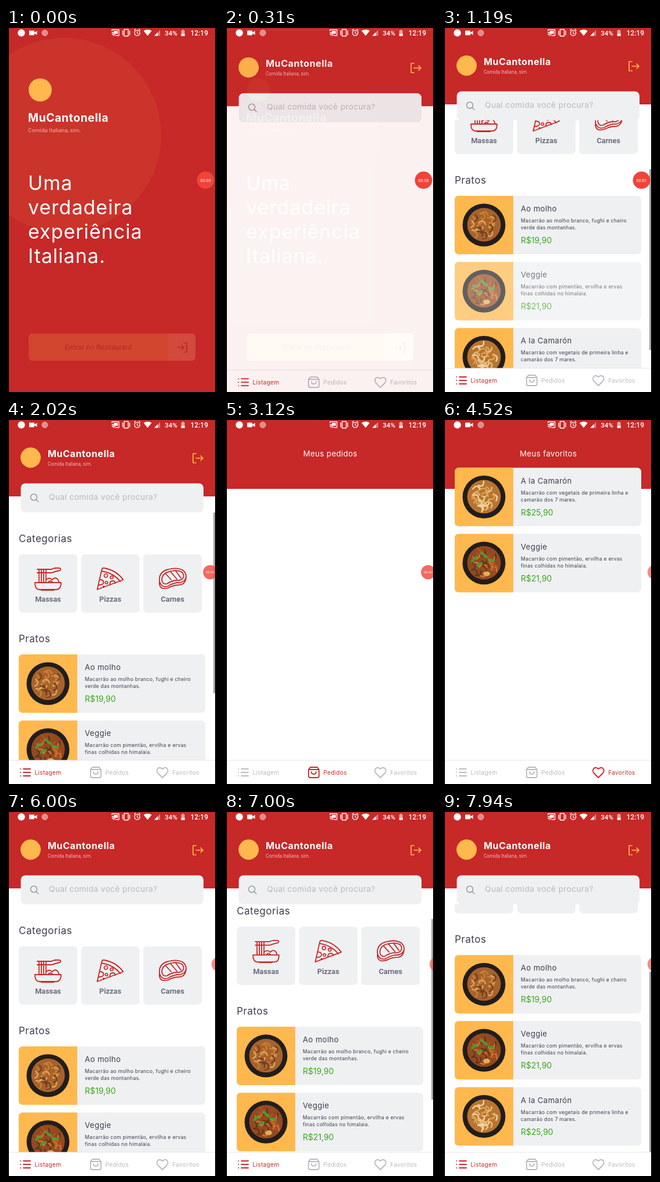
These frames come from a looping animation (366x629 px, 8000 ms). An HTML page:

```html
<!DOCTYPE html>
<html lang="pt">
<head>
<meta charset="utf-8">
<title>Comida Italiana</title>
<style>
html, body { margin: 0; height: 100%; overflow: hidden; background: #000; }
svg { display: block; width: 100vw; height: 100vh; }
text { font-family: Inter, "Open Sans", sans-serif; letter-spacing: .03em; }
.rb { font-family: Roboto, Arial, sans-serif; letter-spacing: 0; }
.mid { text-anchor: middle; }
.line { fill: none; stroke-linecap: round; stroke-linejoin: round; }
</style>
</head>
<body>
<svg id="stage" viewBox="0 0 366 629" preserveAspectRatio="none"></svg>
<script>
const LOOP = 8000, RED = '#c72828', GOLD = '#ffb84d', CARD = '#eff0f2', MUTED = '#bab9c2';
const BRAND = 'MuCantonella', SLOGAN = 'Comida Italiana, sim.';
const MAX_SCROLL = 158, DISH_STEP = 114.2;

const text = (x, y, size, fill, str, extra = '') =>
  `<text x="${x}" y="${y}" font-size="${size}" fill="${fill}" ${extra}>${str}</text>`;
const rect = (x, y, w, h, fill, r = 0) =>
  `<rect x="${x}" y="${y}" width="${w}" height="${h}" rx="${r}" fill="${fill}"/>`;
const circle = (x, y, r, fill, extra = '') =>
  `<circle cx="${x}" cy="${y}" r="${r}" fill="${fill}" ${extra}/>`;
const line = (d, color, width = 2) =>
  `<path class="line" d="${d}" stroke="${color}" stroke-width="${width}"/>`;
const group = (id, body, extra = '') => `<g id="${id}" ${extra}>${body}</g>`;
const move = (x, y, body) => `<g transform="translate(${x} ${y})">${body}</g>`;

function random(seed) {
  return () => (seed = (seed * 16807) % 2147483647) / 2147483647;
}

const dishes = {
  molho: { name: 'Ao molho', price: '19,90', base: '#a8622c', tones: ['#e0a75c', '#c98238', '#71401f'], seed: 71,
    info: ['Macarrão ao molho branco, fughi e cheiro', 'verde das montanhas.'] },
  veggie: { name: 'Veggie', price: '21,90', base: '#94491f', tones: ['#c9782f', '#b54f26', '#5f371d'], seed: 345, greens: true,
    info: ['Macarrão com pimentão, ervilha e ervas', 'finas colhidas no himalaia.'] },
  camaron: { name: 'A la Camarón', price: '25,90', base: '#b9742f', tones: ['#f3d7a2', '#dda45a', '#e9bd7e'], seed: 911,
    info: ['Macarrão com vegetais de primeira linha e', 'camarão dos 7 mares.'] }
};

function plate({ base, tones, seed, greens }) {
  const rnd = random(seed);
  let out = circle(72.5, 50.5, 37, '#211d1c') + circle(72.5, 50, 29, base);
  for (let i = 0; i < 24; i++) {
    const a = rnd() * 6.28, d = Math.sqrt(rnd()) * 22, turn = rnd() * 180;
    const x = 72.5 + d * Math.cos(a), y = 50 + d * Math.sin(a);
    out += `<path class="line" d="M-6 2Q0 -7 6 2" transform="translate(${x} ${y}) rotate(${turn})" stroke="${tones[i % 3]}" stroke-width="2.4"/>`;
  }
  if (greens) {
    out += line('M52 47L60 40M68 33l9 7M80 44l9 2M61 55l7-4', '#4b9a35', 4) +
      '<ellipse cx="77" cy="69" rx="6" ry="4" fill="#e3ae55"/>';
  }
  return out;
}

function dishCard(key, y, id = '') {
  const d = dishes[key];
  return `<g id="${id}" transform="translate(0 ${y})">` +
    rect(22, 0, 322, 101, CARD, 7) +
    `<path d="M29 0H123V101H29Q22 101 22 94V7Q22 0 29 0Z" fill="${GOLD}"/>` + plate(d) +
    text(136, 27, 13.2, '#3d3d4d', d.name) +
    d.info.map((s, i) => text(136, 46 + 12 * i, 8.7, '#3d3d4d', s)).join('') +
    text(136, 82, 14, '#39a817', 'R$' + d.price, 'style="letter-spacing:0"') + '</g>';
}

const pasta = line('M1 27H46Q46 39 38 39H9Q1 39 1 27ZM12 39v1h22v-1M8 27V4M12 27V4M16 27V4M20 27V4M5 4H30M5 10H30M30 4Q33 1 44 2Q47 4 44 6Q35 8 30 10M20 22Q26 17 31 22Q36 16 41 22L43 27M24 27Q27 21 32 27', RED, 1.8);
const pizza = line('M2 39L10 4Q11 1 15 2Q35 6 47 22ZM10 7Q31 11 42 25M7 22Q13 22 13 27Q12 31 5 31M24 31Q23 25 28 24Q33 24 33 28', RED, 1.8) +
  [[17, 15, 3], [27, 18, 2.5], [18, 27, 2.2], [13, 34, 1]].map(([x, y, r]) =>
    circle(x, y, r, 'none', `stroke="${RED}" stroke-width="1.6"`)).join('');
const steak = line('M2 25Q0 8 18 4Q32 0 43 6Q51 14 46 22Q41 28 32 27Q23 29 17 33Q6 37 2 25ZM6 23Q6 11 19 8Q32 4 41 9Q46 15 42 20Q38 24 31 23Q22 24 15 29Q8 31 6 23M2 26Q1 35 8 37Q14 38 22 34Q28 31 37 31Q47 30 48 17M13 12l9 10M21 8l11 13M30 7l9 12', RED, 1.8);

const categories = [['Massas', 22, pasta, 27], ['Pizzas', 129.5, pizza, 26], ['Carnes', 237, steak, 26]]
  .map(([name, x, icon, dx]) => rect(x, 232, 101, 101, CARD, 7) + move(x + dx, 254, icon) +
    text(x + 50.5, 314, 12.8, '#6c6c80', name, 'class="rb mid" font-weight="700"')).join('');

const arrowBox = (x, y, color) => move(x, y, line('M6 1H1V17H6M6 9H18M14 5l4 4l-4 4', color, 1.7));

const splash = rect(5, 0, 356, 629, RED) +
  circle(100, 185, 168, '#cb342a') + circle(59, 107, 20, GOLD) +
  text(38, 162, 19.4, '#fff', BRAND, 'font-weight="700"') +
  text(38, 180, 9.8, '#fff', SLOGAN, 'class="rb" opacity=".62"') +
  ['Uma', 'verdadeira', 'experiência', 'Italiana.'].map((s, i) => text(38, 280 + 42 * i, 34, '#fff', s)).join('') +
  group('enter', rect(39, 528, 288, 47, GOLD, 7) +
    '<path d="M280 528H320Q327 528 327 535V568Q327 575 320 575H280Z" fill="#ffd08a"/>' +
    text(159.5, 556, 12.8, '#8a2a18', 'Entrar no Restaurant', 'class="rb mid"') +
    move(296, 543, line('M11 1H16V17H11M0 9H11M7 5l4 4l-4 4', '#8a2a18', 1.7)));

const listing = rect(5, 0, 356, 629, '#fff') + rect(5, 0, 356, 132, RED) +
  circle(42.5, 65, 17.5, GOLD) +
  text(72, 64, 16.2, '#fff', BRAND, 'font-weight="700"') +
  text(72, 79, 8.2, '#fff', SLOGAN, 'class="rb" opacity=".65"') +
  arrowBox(322, 57, GOLD) +
  `<g clip-path="url(#listClip)">` + group('content',
    text(22, 211, 17, '#3d3d4d', 'Categorias') + categories +
    text(22, 384, 17, '#3d3d4d', 'Pratos') +
    Object.keys(dishes).map((k, i) => dishCard(k, 405 + DISH_STEP * i, k)).join('')) + '</g>' +
  rect(25.5, 109.5, 315.5, 50, CARD, 8) +
  circle(48, 133.5, 5.5, 'none', 'stroke="#999" stroke-width="1.5"') + line('M52 137.500l4 4', '#999', 1.5) +
  text(74, 137.5, 13.7, '#b9b9bd', 'Qual comida você procura?') +
  group('thumb', rect(358, 160, 3, 312, '#a3a5a6'));

const plainScreen = (title, body) => rect(5, 0, 356, 629, '#fff') + rect(5, 0, 356, 119, RED) +
  text(183.5, 62.5, 13.3, '#fff', title, 'class="mid"') + body;

const tabIcons = [
  line('M30 603H42M30 609H42M30 615H42M25 603h.1M25 609h.1M25 615h.1', 'currentColor', 1.8),
  line('M149 600H161L164 604V615Q164 618 161 618H149Q146 618 146 615V604ZM146 604H164M151 608Q151 612 155 612Q159 612 159 608', 'currentColor', 1.8),
  line('M270 618L262 610Q259 606 262 602Q266 599 270 603Q274 599 278 602Q281 606 278 610Z', 'currentColor', 1.8)
];
const tabBar = rect(5, 588, 356, 41, '#fff') + rect(5, 587.5, 356, 1, '#e6e6e8') +
  [['Listagem', 49.5], ['Pedidos', 171.5], ['Favoritos', 287]].map(([name, x], i) =>
    group('tab' + i, tabIcons[i] + text(x, 612.5, 10.1, 'currentColor', name))).join('');

const statusBar = circle(26.5, 8.5, 6.2, '#fff') +
  rect(40, 4.5, 9, 8, '#fff', 1) + '<path d="M48 8.500L53.500 5V12Z" fill="#fff"/>' +
  circle(67, 8.5, 5, '#dd8f89', 'stroke="#eab5b0"') +
  line('M183 5V3H195V13H190M183 8Q188 8 188 13M183 10.500Q185.500 10.500 185.500 13', '#fff', 1.3) + rect(186, 5, 7, 5, '#fff') +
  line('M204 2.500H211V14H204ZM201.500 5V12M213.500 5V12', '#fff', 1.4) +
  circle(226.500, 8.5, 4.6, 'none', 'stroke="#fff" stroke-width="1.4"') +
  line('M226.500 6V9l2 1M221.500 4l2-2M231.500 4l-2-2', '#fff', 1.2) +
  '<path d="M237.500 5Q244.500 .5 251.500 5L244.500 13.500Z" fill="#fff"/>' +
  '<path d="M256 13.500L266 3.500V13.500Z" fill="#fff" opacity=".4"/><path d="M256 13.500L262 7.500V13.500Z" fill="#fff"/>' +
  text(274, 13, 11.6, '#fff', '34%', 'class="rb" font-weight="500"') +
  rect(302.500, 4, 6, 10, '#e5a49f', 1) + rect(304, 3, 3, 2, '#e5a49f') + rect(302.500, 10, 6, 4, '#fff', 1) +
  text(318.5, 13, 12, '#fff', '12:19', 'class="rb" font-weight="500"');

document.getElementById('stage').innerHTML =
  `<defs><clipPath id="listClip">${rect(5, 159, 356, 429, '#000')}</clipPath>` +
  `<clipPath id="phone">${rect(5, 0, 356, 629, '#000')}</clipPath></defs>` +
  rect(0, 0, 366, 629, '#000') +
  `<g clip-path="url(#phone)">` + group('splash', splash) +
  group('app',
    group('page0', listing) +
    group('page1', plainScreen('Meus pedidos', '')) +
    group('page2', plainScreen('Meus favoritos',
      group('favorites', dishCard('camaron', 82.5) + dishCard('veggie', 82.5 + DISH_STEP)))) +
    tabBar) +
  statusBar +
  group('bubble', circle(0, 0, 15, '#f04438') +
    `<text id="timer" class="rb mid" y="2.500" font-size="7.400" fill="#fff"></text>`) + '</g>';

const el = id => document.getElementById(id);
const show = (id, on) => el(id).setAttribute('display', on ? 'inline' : 'none');
const fade = (id, value) => el(id).setAttribute('opacity', value);
const progress = (t, from, to) => Math.min(1, Math.max(0, (t - from) / (to - from)));
const smooth = p => p * p * (3 - 2 * p);
const easeOut = p => 1 - (1 - p) ** 3;

function scrollAt(t) {
  if (t >= 7000) return MAX_SCROLL - 125 * Math.exp((7000 - t) / 140);
  return 115 * (easeOut(progress(t, 860, 1150)) - smooth(progress(t, 1300, 1800)));
}

function pageAt(t) {
  if (t < 2900 || t >= 6000) return 0;
  return t < 3800 ? 1 : 2;
}

function render(t) {
  const enter = easeOut(progress(t, 100, 450));
  show('splash', enter < 1);
  fade('enter', .2 + .8 * progress(t, 0, 250));
  fade('app', enter);
  el('app').setAttribute('transform', `translate(0 ${50 * (1 - enter)})`);

  const page = pageAt(t);
  for (let i = 0; i < 3; i++) {
    show('page' + i, i === page);
    el('tab' + i).setAttribute('color', i === page ? RED : MUTED);
  }
  show('content', t >= 500);
  show('favorites', t >= 3950);

  const scroll = scrollAt(t);
  el('content').setAttribute('transform', `translate(0 ${-scroll})`);
  el('thumb').setAttribute('transform', `translate(0 ${scroll * 116 / MAX_SCROLL})`);
  fade('thumb', t >= 7000 ? 1 : progress(t, 850, 900) * (1 - progress(t, 2100, 2350)));
  fade('veggie', 1 - .3 * (progress(t, 1080, 1160) - progress(t, 1270, 1400)));

  const dock = smooth(progress(t, 1500, 1700)), hide = smooth(progress(t, 4000, 4250));
  el('bubble').setAttribute('transform', `translate(${344.500 + 8 * dock + 14.500 * hide} 263) scale(${1 - .18 * dock})`);
  fade('bubble', 1 - .2 * dock - .18 * hide);
  el('timer').textContent = '00:0' + Math.floor(t / 1000 + .1);
  show('timer', hide < 1);
}

function tick(now) {
  render(now % LOOP);
  requestAnimationFrame(tick);
}
render(0);
requestAnimationFrame(tick);
</script>
</body>
</html>
```
